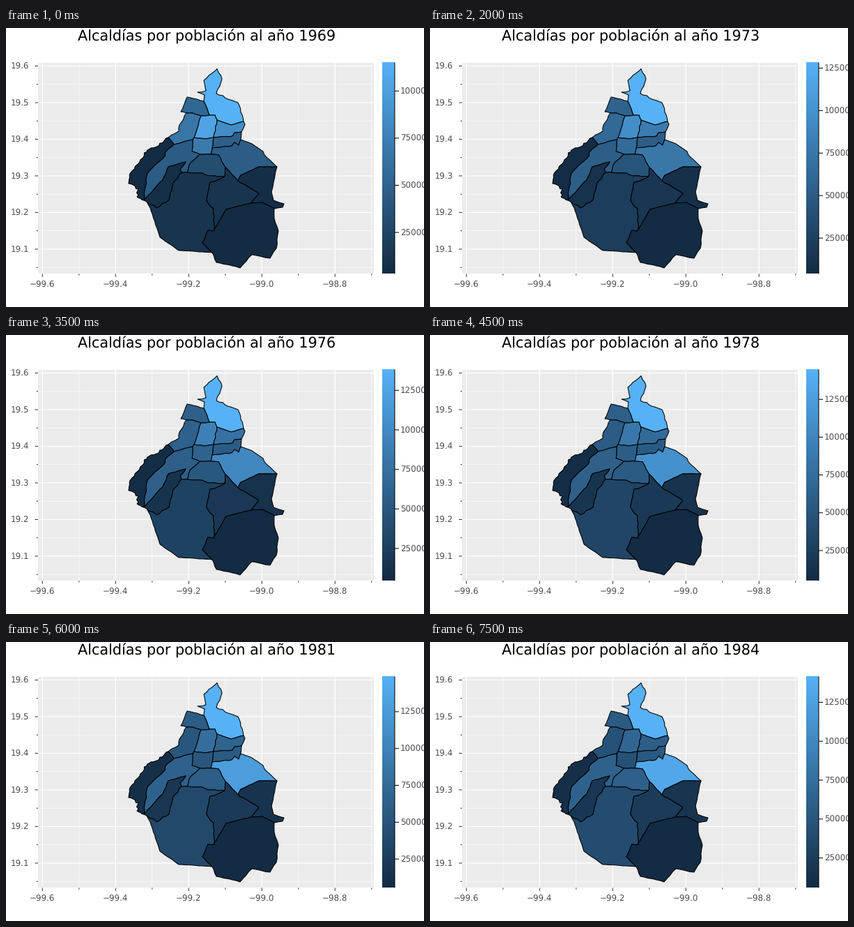
Write a matplotlib script that moves like this. It is 600 px wide and 400 px high and loops after 8 s.

```python
import random

import matplotlib.pyplot as plt
import numpy as np
from matplotlib.animation import FuncAnimation
from matplotlib.collections import LineCollection, PolyCollection

plt.rcParams["font.family"] = "DejaVu Sans"
plt.rcParams["text.hinting"] = "none"

W, H, DPI = 600, 400, 100
PX = 72 / DPI                       # one pixel in points
LEFT, RIGHT, TOP, BOTTOM = 46, 528, 49.5, 352.4
BAR_LEFT, BAR_RIGHT = 540, 558
FIRST_YEAR, YEARS = 1969, 16
LOW, HIGH = np.array([19, 43, 67]) / 255, np.array([86, 177, 247]) / 255
GREY = "#4d4d4d"

# Thousands of inhabitants in 1970 and 1980
CENSUS = dict(gam=(1184, 1513), azc=(535, 602), mh=(648, 543), cua=(1015, 815),
              vc=(825, 693), izc=(477, 570), bj=(675, 545), izp=(522, 1262),
              coy=(339, 597), ao=(457, 639), cuaj=(36, 91), mc=(75, 173),
              tlp=(131, 369), xoc=(116, 217), tlh=(62, 147), mil=(33.7, 53.6))
sides = {name: [] for name in CENSUS}
rng = random.Random(11)


def border(names, *pts, rough=0.5, step=5):
    """Add an uneven line through the key points, shared by the named regions."""
    line = [pts[0]]
    for p, q in zip(pts, pts[1:]):
        p, q = np.array(p), np.array(q)
        length = np.hypot(*(q - p))
        normal = np.array([p[1] - q[1], q[0] - p[0]]) / length
        n = max(1, round(length / step))
        for k in range(1, n):
            line.append(tuple(p + (q - p) * k / n + normal * rng.uniform(-rough, rough)))
        line.append(tuple(q))
    for name in names.split():
        sides[name].append(line)


def ring(lines):
    """Chain border lines end to end into one closed outline."""
    rest = list(lines)
    out = list(rest.pop(0))
    while rest:
        nxt = next(l for l in rest if out[-1] in (l[0], l[-1]))
        rest.remove(nxt)
        out += nxt[1:] if nxt[0] == out[-1] else nxt[-2::-1]
    return out


# North
border("gam", (284, 105), (285, 96), (275, 92), (287, 90), (284, 75),
       (303, 58.5), (310, 73), (302, 94), (333, 107), (341, 134), rough=1)
border("gam azc", (284, 105), (292, 125))
border("gam cua", (292, 125), (300, 125), (303, 132))
border("gam vc", (303, 132), (323, 139), (341, 134))
border("azc", (259, 122), (251, 120), (260, 99), (284, 105))
border("azc mh", (259, 122), (268, 122), (280, 126))
border("azc cua", (280, 126), (292, 125))
border("mh", (259, 122), (249, 139), (248, 148), (233, 157), rough=0.8)
border("mh cuaj", (233, 157), (241, 167))
border("mh ao", (241, 167), (268, 160))
border("mh bj", (268, 160), (270, 157))
border("mh cua", (280, 126), (270, 157))

# Centre
border("cua bj", (270, 157), (285, 159), (298, 157))
border("cua vc", (303, 132), (298, 157), rough=1)
border("vc", (341, 134), (343, 138), (338, 149))
border("vc izc", (298, 157), (325, 155), (328, 150), (338, 149))
border("izc", (338, 149), (337, 160))
border("izc bj", (298, 157), (296, 172))
border("izc izp", (296, 172), (324, 169), (328, 164), (334, 168), (337, 160))
border("bj izp", (296, 172), (294, 181))
border("bj coy", (278, 181), (294, 181))
border("bj ao", (268, 160), (267, 177), (278, 181))
border("izp", (337, 160), (353, 166), (369, 177), (371, 182), (389, 199), rough=0.3)
border("coy izp", (294, 181), (305, 182), (315, 200))
border("coy ao", (278, 181), (264, 194), (260, 207))
border("coy tlp", (260, 207), (281, 208), (290, 212), (314, 213))
border("coy xoc", (315, 200), (314, 213))

# West
border("cuaj", (233, 157), (214, 171), (203, 175), (180, 206), (176, 223),
       (190, 231), (188, 242), (198, 247), rough=1.6, step=3)
border("ao cuaj", (241, 167), (232, 174), (225, 187), (203, 208), (198, 247), rough=1.2)
border("ao mc", (252, 207), (250, 202), (258, 192), (233, 199), (225, 218),
       (211, 233), (198, 247), rough=0.8)
border("ao tlp", (252, 207), (260, 207))
border("mc", (198, 247), (202, 249))
border("mc tlp", (202, 249), (216, 258), (234, 247), (240, 222), (252, 207), rough=1.2)

# South and east
border("izp xoc", (315, 200), (333, 219))
border("izp tlh", (333, 219), (337, 211), (363, 199), (389, 199), rough=0.3)
border("tlh", (389, 199), (381, 235), (384, 247), (399, 252), (397, 257), (385, 259))
border("tlh xoc", (333, 219), (363, 237), (352, 251))
border("tlh mil", (352, 251), (368, 250), (385, 259), rough=0.3)
border("xoc mil", (298, 291), (316, 260), (352, 251), rough=0.3)
border("xoc tlp", (314, 213), (293, 221), (288, 247), (298, 259), (298, 291), rough=1.4)
border("mil tlp", (298, 291), (290, 290), (282, 308), (296, 322))
border("mil", (385, 259), (385, 273), (391, 291), (388, 316), (379, 330), (353, 325),
       (336, 344), (302, 336), (296, 322), rough=0.7, step=6)
border("tlp", (296, 322), (248, 319), (221, 300), (207, 258), (202, 249), rough=0.3)

fig = plt.figure(figsize=(W / DPI, H / DPI), dpi=DPI, facecolor="white")
ax = fig.add_axes([0, 0, 1, 1])
ax.axis("off")


def segs(lines, color="black", width=1.0, z=5):
    lc = LineCollection(lines, colors=color, linewidths=width * PX, zorder=z,
                        capstyle="butt", snap=False)
    ax.add_collection(lc, autolim=False)
    return lc


def label(x, y, text, size=11.86, color=GREY, ha="left"):
    return ax.text(x, y, text, fontsize=size * PX, color=color, ha=ha,
                   va="baseline", zorder=6)


# Panel with grid, ticks and tick labels; every second line is major
ax.fill([LEFT, RIGHT, RIGHT, LEFT], [TOP, TOP, BOTTOM, BOTTOM], color="#ebebeb", lw=0)
for i in range(12):
    x, y = 52.3 + 52.5 * i, 54.5 + 26.25 * i
    grid, tick = (0.6, 2.3) if i % 2 else (1.3, 4.5)
    segs([[(LEFT, y), (RIGHT, y)]], "white", grid, 2)
    segs([[(LEFT - tick, y), (LEFT, y)]], "#333333")
    if i % 2 == 0:
        label(33, y + 4.4, f"{19.6 - 0.05 * i:.1f}", ha="right")
    if x < RIGHT:
        segs([[(x, TOP), (x, BOTTOM)]], "white", grid, 2)
        segs([[(x, BOTTOM), (x, BOTTOM + tick)]], "#333333")
        if i % 2 == 0:
            label(x, 371.4, f"\u2212{99.6 - 0.1 * i:.1f}", ha="center")

regions = PolyCollection([ring(s) for s in sides.values()], edgecolors="black",
                         linewidths=1.05 * PX, zorder=4)
ax.add_collection(regions, autolim=False)

# Colour bar
ramp = HIGH + (LOW - HIGH) * np.linspace(0, 1, 256)[:, None, None]
ax.imshow(ramp, extent=(BAR_LEFT, BAR_RIGHT, BOTTOM, TOP), aspect="auto",
          interpolation="bilinear", zorder=3)
ax.set(xlim=(0, W), ylim=(H, 0))
segs([[(BAR_RIGHT, TOP), (BAR_RIGHT, BOTTOM)]])
bar_ticks = segs([])
bar_labels = [label(566, 0, f"{250000 * n}") for n in range(1, 7)]
title = label(287.6, 19, "", 20.75, "black", "center")


def population(year):
    """Steady growth to 1980, then a slowdown that hits large regions hardest."""
    start, end = np.array(list(CENSUS.values())).T
    growth = (end - start) / 10
    if year > 1980:
        growth = 0.7 * growth - 0.0323 * end + 1.5
    return end + growth * (year - 1980)


def draw(i):
    year = FIRST_YEAR + i
    pop = population(year)
    lo, hi = pop.min(), pop.max()
    regions.set_facecolor(LOW + (HIGH - LOW) * ((pop - lo) / (hi - lo))[:, None])
    marks = []
    for n, text in enumerate(bar_labels, 1):
        y = BOTTOM - (BOTTOM - TOP) * (250 * n - lo) / (hi - lo)
        text.set_visible(y >= TOP)
        text.set_y(y + 4.4)
        if y >= TOP:
            marks.append([(BAR_RIGHT, y), (BAR_RIGHT + 6, y)])
    bar_ticks.set_segments(marks)
    title.set_text(f"Alcaldías por población al año {year}")
    return [regions, bar_ticks, title, *bar_labels]


anim = FuncAnimation(fig, draw, frames=YEARS, interval=500, repeat=True,
                     repeat_delay=0, blit=False)
plt.show()
```
